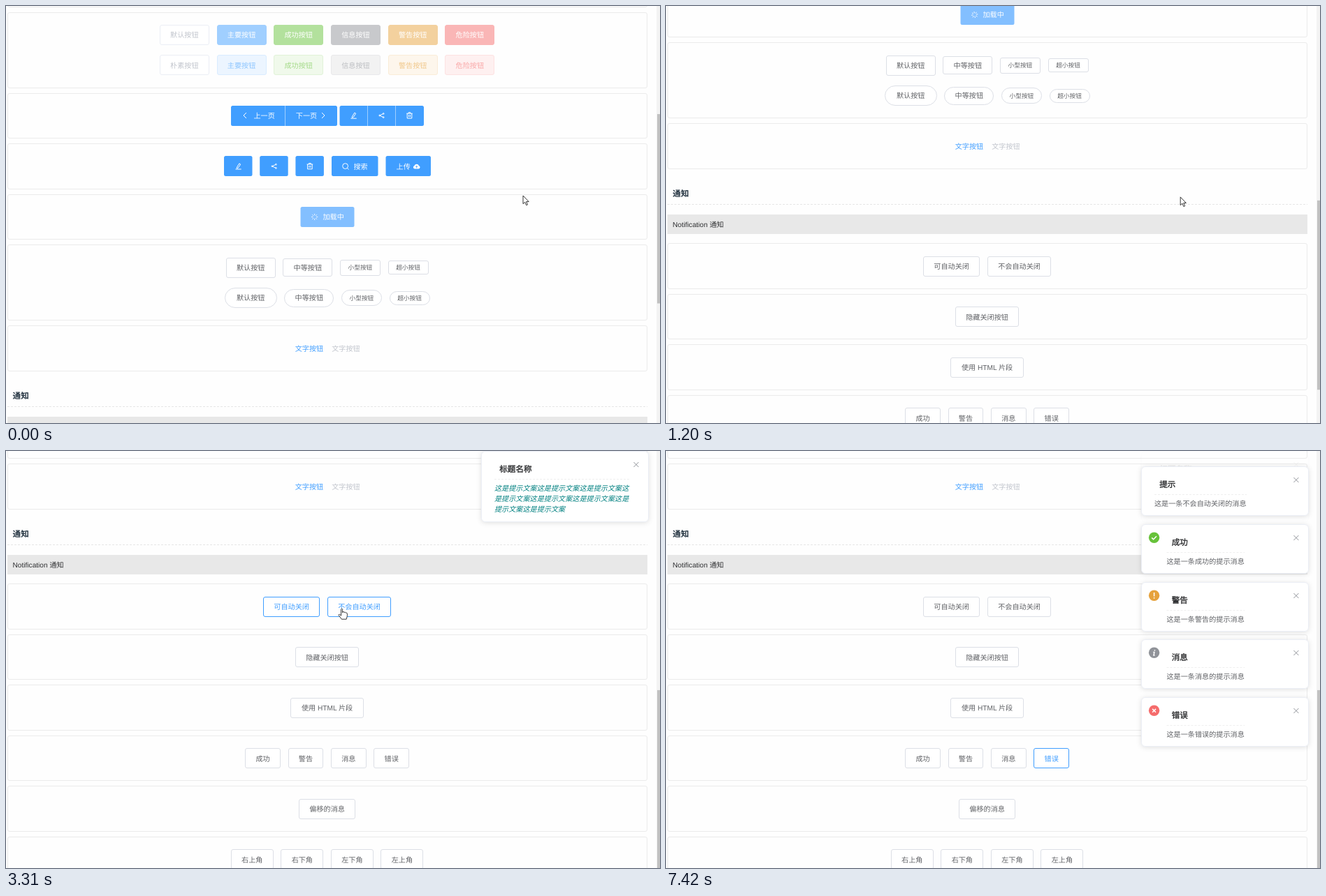
Write an HTML page that moves like this. It is 936 px wide and 598 px high and loops after 7520 ms.

```html
<!DOCTYPE html>
<html lang="zh-CN">
<head>
<meta charset="utf-8">
<title>Buttons and notifications</title>
<style>
  html, body { margin: 0; width: 100%; height: 100%; overflow: hidden; background: #fefefe; }
  svg { display: block; width: 936px; height: 598px; }
  text { font-family: "Liberation Sans", "Noto Sans CJK SC", "Noto Sans CJK", sans-serif; text-rendering: geometricPrecision; }
  .card { filter: drop-shadow(0 1.5px 3.5px rgba(0, 0, 0, .12)); }
</style>
</head>
<body>
<svg id="stage" viewBox="0 0 936 598"></svg>
<script>
const LOOP = 7520;
const ZOOM = .725;
const FS = 14 * ZOOM, TITLE = 16 * ZOOM, SMALL = 12 * ZOOM;
const NOTCH = 100 * ZOOM, MAX_SCROLL = 440;
const MID = 459.6, GAP = 10.6;
const BLUE = '#409eff', TEXT = '#606266', LINE = '#dcdfe6', PALE = '#c0c4cc', DARK = '#303133';

// Bursts of screen refreshes: start, length, count.
const BURSTS = [[0, 0, 1], [120, 960, 8], [1200, 690, 6], [2200, 960, 8], [3310, 360, 4],
  [3950, 930, 8], [5010, 950, 8], [6080, 690, 6], [7300, 120, 2]];
const WHEEL = [60, 240, 380, 840, 1240, 1640, 2040];

// Pointer stops: time, x, y.
const STOPS = [[0, 740, 272], [1890, 734, 275], [2350, 714, 275.5], [2770, 412, 224],
  [3400, 492, 226], [3670, 462, 312], [4340, 385, 463], [4460, 374.5, 448], [4730, 375, 448],
  [5550, 553, 438], [5670, 612, 423], [5960, 692, 444], [6770, 935, 605]];

function el(parent, tag, attrs, content) {
  const node = document.createElementNS('http://www.w3.org/2000/svg', tag);
  for (const k in attrs) node.setAttribute(k, attrs[k]);
  if (content) node.textContent = content;
  parent.appendChild(node);
  return node;
}

const text = (p, s, x, cy, fill = TEXT, size = FS, more = {}) =>
  el(p, 'text', { x, y: cy + size * .38, fill, 'font-size': size, 'text-anchor': 'middle', ...more }, s);

const path = (p, d, stroke, width = 1, more = {}) =>
  el(p, 'path', { d, stroke, 'stroke-width': width, fill: 'none', ...more });

const dashes = (p, x1, x2, y, stroke) =>
  path(p, `M${x1} ${y}H${x2}`, stroke, 1, { 'stroke-dasharray': '3 2' });

const frame = (p, x, y, w, h, fill, stroke, rx = 2.5) =>
  el(p, 'rect', { x: x + .5, y: y + .5, width: w - 1, height: h - 1, rx, fill, stroke });

const group = (p, x = 0, y = 0) => el(p, 'g', { transform: `translate(${x} ${y})` });

const stage = document.getElementById('stage');
el(stage, 'rect', { width: 936, height: 598, fill: '#fefefe' });
const page = group(stage);

// Text width in em; Latin letters average about half an em.
const ems = s => [...s].reduce((n, c) => n + (c < '\x7f' ? .55 : 1), 0);

// Centred row of buttons, snapped to whole pixels.
function row(cy, specs) {
  specs.forEach(s => s.w = s.w || ems(s.name) * FS + 30.5);
  let x = MID - (specs.reduce((n, s) => n + s.w + GAP, -GAP)) / 2;
  return specs.map(({ name, w, h = 29, fill = '#fff', stroke = LINE, color = TEXT, size = FS, round }) => {
    const left = Math.round(x), right = Math.round(x + w), top = Math.round(cy - h / 2);
    const rect = frame(page, left, top, right - left, h, fill, stroke, round ? h / 2 : 2.5);
    const label = text(page, name, x + w / 2, cy, color, size);
    x += w + GAP;
    return { name, rect, label, left, right, top, bottom: top + h };
  });
}

const ICONS = {
  edit: 'M-2 1.4 1.4-4 3.2-2.8-.2 2.2-2.3 3ZM-4 4.2H4.2',
  share: 'M-2.8 0 2.6-2.6M-2.8 0 2.6 2.6M-3.6 0a.9.9 0 1 0 1.8 0a.9.9 0 1 0-1.8 0M1.8-2.6a.9.9 0 1 0 1.8 0a.9.9 0 1 0-1.8 0M1.8 2.6a.9.9 0 1 0 1.8 0a.9.9 0 1 0-1.8 0',
  trash: 'M-4.3-2.8H4.3M-3.3-2.8V4H3.3V-2.8M-1.4-2.8V-4.3H1.4V-2.8M-1-.8V2M1-.8V2',
  search: 'M-4.3-.4a3.9 3.9 0 1 0 7.8 0a3.9 3.9 0 1 0-7.8 0M2.4 2.4 4.5 4.5',
  prev: 'M2-4-2 0 2 4',
  next: 'M-2-4 2 0-2 4'
};
const icon = (name, x, y) => path(group(page, x, y), ICONS[name], '#fff');

// Bordered sections holding one or two rows each.
function sections(y, rows) {
  for (const n of rows) {
    const h = (30 + 60 * n) * ZOOM, top = Math.round(y);
    frame(page, 2, top, 916, Math.round(y + h) - top, 'none', '#ebebeb');
    y += h + 10 * ZOOM;
  }
}
sections(8.8 - NOTCH, [1, 2, 1, 1, 1, 2, 1]);
sections(630.3, [1, 1, 1, 1, 1, 1]);

// Disabled buttons, solid and plain.
const KINDS = [['默认', '#fff', '#ebeef5', PALE, '#fff', '#ebeef5', PALE],
  ['主要', '#a0cfff', '#a0cfff', '#fff', '#ecf5ff', '#d9ecff', '#8cc5ff'],
  ['成功', '#b3e19d', '#b3e19d', '#fff', '#f0f9eb', '#e1f3d8', '#a4da89'],
  ['信息', '#c8c9cc', '#c8c9cc', '#fff', '#f2f2f2', '#e9e9eb', '#bcbec2'],
  ['警告', '#f3d19e', '#f3d19e', '#fff', '#fdf6ec', '#faecd8', '#f0c78a'],
  ['危险', '#fab6b6', '#fab6b6', '#fff', '#fef0f0', '#fde2e2', '#f9a7a7']];
row(41.3, KINDS.map(([s, fill, stroke, color]) => ({ name: s + '按钮', fill, stroke, color })));
row(84.8, KINDS.map(([s, , , , fill, stroke, color], i) =>
  ({ name: (i ? s : '朴素') + '按钮', fill, stroke, color })));

const solid = (x, y, w, fill = BLUE) => el(page, 'rect', { x, y, width: w, height: 29, rx: 2.5, fill });

// Button groups and icon buttons.
solid(322, 143, 152);
solid(477.5, 143, 120.5);
[399.5, 517.5, 557.5].forEach(x => path(page, `M${x} 143v29`, '#a0cfff'));
icon('prev', 342, 157);
text(page, '上一页', 369.7, 157, '#fff');
text(page, '下一页', 430, 157, '#fff');
icon('next', 454, 157);
['edit', 'share', 'trash'].forEach((name, i) => {
  icon(name, 497.5 + 40 * i, 157);
  solid(312 + 51.2 * i, 215, 40.5);
  icon(name, 332.5 + 51.2 * i, 229.8);
});
solid(466, 215, 66.5);
icon('search', 486, 230);
text(page, '搜索', 507.5, 229.8, '#fff');
solid(543.5, 215, 64.5);
text(page, '上传', 568.7, 229.8, '#fff');
const cloud = group(page, 587.7, 230);
path(cloud, 'M-2.6 3.4a2.3 2.3 0 0 1-.6-4.5a3.4 3.4 0 0 1 6.4 0a2.3 2.3 0 0 1-.6 4.5Z', 'none', 0, { fill: '#fff' });
path(cloud, 'M0 2.4V-.8M-1.4.6 0-.8 1.4.6', BLUE, .9);

// Loading button.
solid(421.5, 288, 77, '#83bfff');
const spinner = group(group(page, 441.7, 302.5));
for (let a = 0; a < 360; a += 45) path(spinner, 'M2.3 0H4.6', '#fff', .9, { transform: `rotate(${a})` });
text(page, '加载中', 468.7, 302.5, '#fff');

// Sizes, square and round.
const sizes = round => ['默认', '中等', '小型', '超小'].map((s, i) => ({
  name: s + '按钮', round, h: 29 - 3 * i, w: i > 1 ? 58 : round && !i ? 75 : 71, size: i > 1 ? SMALL : FS
}));
row(375, sizes(false));
row(418.5, sizes(true));

text(page, '文字按钮', 434, 490.7, BLUE);
text(page, '文字按钮', 486.5, 490.7, PALE);

// Notification section.
text(page, '通知', 21.2, 559, '#1f2f3d', TITLE, { 'font-weight': 700 });
dashes(page, 2, 918, 574.5, '#e6e6e6');
el(page, 'rect', { x: 2, y: 589, width: 916, height: 28, fill: '#e8e8e8' });
text(page, 'Notification 通知', 9.5, 603.2, DARK, FS, { 'text-anchor': 'start' });

const live = ['可自动关闭,不会自动关闭', '隐藏关闭按钮', '使用 HTML 片段', '成功,警告,消息,错误',
  '偏移的消息', '右上角,右下角,左下角,左上角'
].flatMap((names, i) => row(663.3 + NOTCH * i, names.split(',').map(name => ({ name }))));

// Notification cards.
const MARKS = {
  成功: ['#67c23a', 'M-3.4.1-1 2.5 3.4-2'],
  警告: ['#e6a23c', 'M0-4.2V1.2M0 2.6V4.2'],
  消息: ['#909399', 'M1-4.2.7-2.7M-1.3-.9H.3L-.6 3.8H1'],
  错误: ['#f56c6c', 'M-2.4-2.4 2.4 2.4M2.4-2.4-2.4 2.4']
};

function card(opener, top, start, title, lines) {
  const g = group(stage), mark = MARKS[title], tall = lines.length > 1;
  const x = mark ? 716.5 : 699;
  const left = { 'text-anchor': 'start' };
  frame(g, 680, 0, 240, tall ? 102 : 71, '#fff', '#ebeef5', 5.5).setAttribute('class', 'card');
  if (mark) {
    const m = group(g, 698.6, 19.3);
    el(m, 'circle', { r: 7.7, fill: mark[0] });
    path(m, mark[1], '#fff', 1.5);
  }
  text(g, title, x + 7.2, 25.4, DARK, TITLE, { ...left, stroke: DARK, 'stroke-width': .4 });
  dashes(g, x, x + FS * lines[0].length, 40.5, '#efefef');
  lines.forEach((s, i) => text(g, s, x, 53 + 15.3 * i, tall ? '#008080' : TEXT, FS,
    tall ? { ...left, 'font-style': 'italic' } : left));
  path(g, 'M898.4 16l7 7M905.4 16l-7 7', '#909399');
  return { g, opener, top, start };
}

const phrase = '这是提示文案'.repeat(8);
const cards = [
  card('可自动关闭', 0, 2720, '标题名称', [phrase.slice(0, 19), phrase.slice(19, 38), phrase.slice(38)]),
  card('不会自动关闭', 113, 3400, '提示', ['这是一条不会自动关闭的消息']),
  ...Object.keys(MARKS).map((name, i) =>
    card(name, 196 + 82.5 * i, 4740 + 260 * i, name, [`这是一条${name}的提示消息`]))
];
const CLOSE = cards[0].start + 4500;

// Scrollbar and pointers.
el(stage, 'rect', { x: 931, width: 5, height: 598, fill: '#f3f3f3' });
const thumb = el(stage, 'rect', { x: 932, width: 4, height: 271.5, fill: '#c1c1c1' });
const look = { fill: '#fff', 'stroke-linejoin': 'round' };
const arrow = path(stage, 'M0 0V11.7L2.7 9.2 4.7 13.7 6.5 12.9 4.6 8.6H8.2Z', '#222', .9, look);
const hand = path(stage, 'M-1 1.2Q0-.8 1.1 1.2V6L1.2 5Q2.6 4.2 3.4 5.6Q5 4.8 5.8 6.4Q7.6 5.8 7.8 7.6V11L6.6 15.5H-.2L-4.4 9.8Q-4.6 8.2-3 8.6L-1 10.4Z', '#222', .9, look);

// CSS "ease": cubic-bezier(.25, .1, .25, 1).
function ease(p) {
  if (p <= 0) return 0;
  if (p >= 1) return 1;
  let lo = 0, hi = 1, u;
  for (let i = 0; i < 20; i++) {
    u = (lo + hi) / 2;
    if (.75 * u * (1 - u) + u ** 3 < p) lo = u; else hi = u;
  }
  return .3 * u * (1 - u) ** 2 + 3 * u * u * (1 - u) + u ** 3;
}

// Each wheel notch eases the page down until it reaches the end.
const scrollAt = t => Math.round(Math.min(MAX_SCROLL,
  WHEEL.reduce((sum, start) => sum + NOTCH * ease((t - start) / 150), 0)));

function pointerAt(t) {
  const i = STOPS.findIndex(s => s[0] > t);
  if (i < 0) return STOPS[STOPS.length - 1].slice(1);
  const [t0, x0, y0] = STOPS[i - 1], [t1, x1, y1] = STOPS[i];
  const p = (t - t0) / (t1 - t0);
  return [x0 + (x1 - x0) * p, y0 + (y1 - y0) * p];
}

function hoveredAt(t) {
  if (t < 0) return;
  const [x, py] = pointerAt(t), y = py + scrollAt(t);
  return live.find(b => x >= b.left && x < b.right && y >= b.top && y < b.bottom);
}

// Latest refresh at or before now; refreshes sit on a 30 ms grid.
function refreshAt(now) {
  let t = 0;
  for (const [start, length, count] of BURSTS)
    for (let i = 0; i < count; i++) {
      const s = start + (i && Math.floor(length * i / (count - 1) / 30) * 30);
      if (s <= now) t = s;
    }
  return t;
}

const move = (node, x, y) => node.setAttribute('transform', `translate(${x} ${y})`);
const show = (node, on) => node.setAttribute('visibility', on ? 'visible' : 'hidden');

function draw(t) {
  const scroll = scrollAt(t);
  move(page, 0, -scroll);
  thumb.setAttribute('y', 155 + scroll * .427);
  spinner.setAttribute('transform', `rotate(${t * .18})`);

  // Opening a card focuses its button; hover fades in over two levels.
  const opened = cards.filter(c => t >= c.start).pop();
  const hover = hoveredAt(t), before = hoveredAt(t - 60);
  for (const b of live) {
    const focused = opened && opened.opener === b.name;
    const level = focused ? 2 : b === hover ? 1 + (b === before) : 0;
    b.rect.setAttribute('stroke', [LINE, '#b3d4f5', BLUE][level]);
    b.label.setAttribute('fill', [TEXT, '#5b738c', BLUE][level]);
  }

  const lift = cards[1].top * ease((t - CLOSE) / 400);
  cards.forEach((c, i) => {
    show(c.g, t >= c.start);
    move(c.g, 251 * (1 - ease((t - c.start) / 300)), i ? Math.round(c.top - lift) : 0);
  });
  cards[0].g.setAttribute('opacity', 1 - ease((t - CLOSE) / 300));

  const [x, y] = pointerAt(t);
  move(arrow, x, y);
  move(hand, x, y);
  show(arrow, !hover);
  show(hand, hover);
}

const origin = performance.now();
let last = -1;
function tick() {
  const t = refreshAt((performance.now() - origin) % LOOP);
  if (t !== last) draw(last = t);
  requestAnimationFrame(tick);
}
tick();
</script>
</body>
</html>
```
